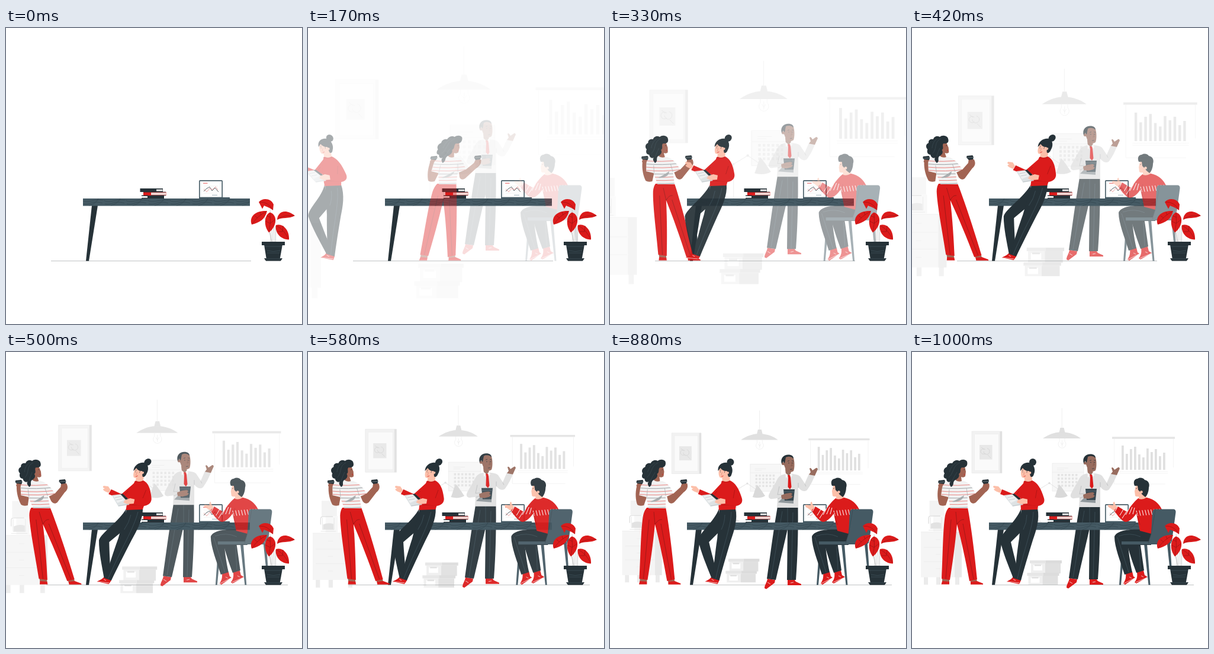
Animation of 500x500 px, one loop 1.04 s. Source, as an HTML page with a canvas:

```html
<!DOCTYPE html>
<html lang="en">
<head>
<meta charset="utf-8">
<title>Office team</title>
<style>
html, body { margin: 0; width: 100%; height: 100%; overflow: hidden; background: #fff; }
canvas { display: block; width: 500px; height: 500px; }
</style>
</head>
<body>
<canvas id="stage" width="500" height="500"></canvas>
<script>
const LOOP = 1040, STEP = 1000 / 24;
const RED = '#db1b1b', DEEP = '#a51212', INK = '#263238', SLATE = '#455a64';
const BROWN = '#a26453', TAN = '#986c5e', SKIN = '#fcbfa9', GREY = '#e0e0e0';

const stage = document.getElementById('stage').getContext('2d');
const sheet = document.createElement('canvas');
sheet.width = sheet.height = 500;
const layer = sheet.getContext('2d');
let g = stage;

const cache = {};
const path = d => cache[d] || (cache[d] = new Path2D(d));
function fill(color, d) { g.fillStyle = color; g.fill(path(d)); }
function line(color, width, d) {
  g.strokeStyle = color;
  g.lineWidth = width;
  g.stroke(path(d));
}
function box(color, x, y, w, h) { g.fillStyle = color; g.fillRect(x, y, w, h); }
function dot(color, x, y, r) {
  g.fillStyle = color;
  g.beginPath();
  g.arc(x, y, r, 0, 7);
  g.fill();
}

// cubic-bezier(.36, -.01, .5, 1.38)
function ease(x) {
  if (x <= 0) return 0;
  if (x >= 1) return 1;
  const curve = (s, a, b) => 3 * (1 - s) * (1 - s) * s * a + 3 * (1 - s) * s * s * b + s * s * s;
  let lo = 0, hi = 1;
  for (let i = 0; i < 24; i++) {
    const mid = (lo + hi) / 2;
    if (curve(mid, .36, .5) < x) lo = mid; else hi = mid;
  }
  return curve(lo, -.01, 1.38);
}

function group(draw, alpha, matrix) {
  layer.setTransform(1, 0, 0, 1, 0, 0);
  layer.clearRect(0, 0, 500, 500);
  layer.setTransform(...matrix);
  g = layer;
  draw();
  g = stage;
  g.globalAlpha = Math.max(0, Math.min(1, alpha));
  g.drawImage(sheet, 0, 0);
  g.globalAlpha = 1;
}

// Rush in from one side, lean over, settle
function rush(draw, p, dir) {
  let shift = 0, lean = 0, alpha = 1;
  if (p < .6) {
    const e = ease(p / .6);
    shift = -255 * (1 - e);
    lean = 20 - 30 * e;
    alpha = e;
  } else if (p < .8) lean = -10 + 12 * ease((p - .6) / .2);
  else lean = 2 - 2 * ease((p - .8) / .2);
  const k = Math.tan(lean * Math.PI / 180) * dir;
  group(draw, alpha, [1, 0, k, 1, shift * dir - k * 286, 0]);
}

function backdrop() {
  // picture
  box('#f2f2f2', 101, 134, 51, 70.5);
  box(GREY, 148.5, 134, 3.5, 70.5);
  line('#e6e6e6', .6, 'M101 134H152V204.5H101ZM106 139H146V200H106Z');
  box('#fafafa', 106, 139, 40, 61);
  box('#e8e8e8', 114, 157, 21.5, 24.5);
  line('#d4d4d4', .8, 'M124 165A4.5 4.5 0 1 0 124 171M121 168A5 5 0 1 0 127 163M117 161L122 165M128 174L133 179');

  // ceiling lamp
  line('#e8e8e8', .7, 'M253.2 95V128');
  fill(GREY, 'M250.5 128H256.5L258.5 136H248.5Z');
  fill(GREY, 'M221 146C231 139 241 136 249 135.5H258C270 137 279 141 285 146Z');
  line('#ebebeb', .7, 'M249 146V151A6.5 6.5 0 1 0 258 151V146M251 153L253.5 157L256 153M253.5 149V160');

  // calendar
  box('#f7f7f7', 237, 188, 53, 47);
  line('#e8e8e8', .7, 'M237 188H290V235H237ZM245 196H264M245 199H257M237 203H290');
  for (let r = 0; r < 4; r++)
    for (let c = 0; c < 6; c++) box('#e4e4e4', 246 + c * 6, 206 + r * 6, 3.4, 3.6);

  // desk lamp
  line('#e4e4e4', 1, 'M213 287V233L232 221.5L249 233');
  dot(GREY, 232, 221.5, 1.7);
  dot(GREY, 213, 233, 1.5);
  fill('#d9d9d9', 'M249 224C253 228 258 236 263 243C257 247 248 247 241 245C244 239 245 231 249 224Z');
  fill('#e8e8e8', 'M206 288Q213 280 220 288Z');

  // bar chart
  box('#e4e4e4', 338, 143.3, 106, 3.4);
  line('#efefef', .7, 'M341.5 147V223H428M441.5 147V195M351 202H432M351 205H432');
  [158, 172, 164, 160, 173, 178, 163, 169, 164, 176, 170].forEach((y, i) => box(GREY, 354 + i * 7, y, 3.8, 199 - y));

  // cabinet and coffee maker
  box('#f3f3f3', 29.5, 251, 25, 25);
  box('#f7f7f7', 36, 276, 20, 27);
  fill('#e2e2e2', 'M32 290Q40 286 49 289V298H32Z');
  line(GREY, 1.4, 'M28 290V281Q28 277 32 277H48');
  line(GREY, .8, 'M31 279V298H50V279M28 301H53');
  for (const x of [20, 41, 73]) box('#ebebeb', x, 380, 7, 13);
  box('#f5f5f5', 15, 304, 57, 76.5);
  box('#e8e8e8', 72, 304, 12, 76.5);
  line('#e9e9e9', .7, 'M15 304H84M20 330H71M20 354H71M40 317H48M40 342H48M40 366H48');

  // cartons
  for (const [x, y, h] of [[199, 352, 17], [194.5, 373, 15]]) {
    box('#efefef', x + 2, y + 5, 24, h);
    box(GREY, x + 26, y + 5, 26, h);
    box('#e6e6e6', x, y, 27, 5);
    box('#dcdcdc', x + 27, y, 27, 5);
    box('#fff', x + 6, y + 8, 15, 9);
    box(GREY, x + 8, y + 7, 11, 2.5);
  }
}

function desk() {
  fill(INK, 'M145 300H155L140 393.5H135Z');
  box(SLATE, 130, 288, 282, 12.5);
  g.save();
  g.beginPath();
  g.rect(130, 288, 282, 12.5);
  g.clip();
  for (let i = 0; i < 8; i++) {
    const x = 128 + i * 37;
    line('#2f424b', .6, `M${x} 291C${x + 10} 297 ${x + 20} 288 ${x + 36} 291M${x + 2} 297C${x + 16} 300 ${x + 16} 290 ${x + 35} 296M${x + 12} 300Q${x + 24} 297 ${x + 28} 288`);
  }
  g.restore();

  // books
  box(INK, 226.5, 271, 38.5, 6);
  box('#e8e8e8', 254, 272.6, 10.5, 3);
  box(RED, 232, 277, 38.5, 6);
  box('#f6d9d6', 245, 278, 25.5, 4.2);
  line('#c9a5a3', .4, 'M245 280H270');
  box(INK, 229, 283, 38, 5);
  box('#fff', 229, 284, 10, 2.8);
  line(INK, .8, 'M229 283H240M229 287.5H240M232 277.2H270M245 282.8H270');

  // laptop
  fill(SLATE, 'M328 257H364Q366 257 366 259V287H326V259Q326 257 328 257Z');
  box('#f7f9fa', 327.6, 258.7, 36.8, 27);
  box('#fff', 331, 260.5, 30, 24);
  box(SLATE, 326, 286, 52, 2.2);
  box('#ef8d8d', 333, 261.6, 7.5, 1.5);
  line('#dde1e3', .5, 'M334 267H358M334 271H358M334 275H358M334 279H358');
  line(INK, .7, 'M334 276L339 271L344 268.5L348 275L353 270L359 277');
  line('#ef8d8d', .7, 'M334 272L339 277L344 271L349 273L354 268L358 274');
  line('#78909c', .7, 'M348 282.3H357');
}

function standing() {
  // legs and shoes
  fill(RED, 'M266 382L279 384L278 389L264 399.5L261 398C261 392 265 389 266 382Z');
  fill(RED, 'M300 383H311L314 387L323 391V393H300Z');
  line('#fff', .7, 'M266 388L271 391M305 389L310 388');
  fill(INK, 'M283 260H317.5C318 300 317 345 314 384H299L300 298L280 384L265 382C271 340 276 300 283 260Z');
  line(SLATE, .6, 'M300 262V298M291 268L272 381M309 270L306 383');
  // shirt
  fill(GREY, 'M297 205C289 206 285 209 282 215C277 225 271 233 268 241C267 246 271 248 275 247L283 246L282 262H318V228C323 234 329 236 333 232C339 224 343 215 346 208L336 205L329 221L321 209C317 206 312 205 306 205Z');
  line('#a9adaf', .6, 'M286 226L283 240L291 239M318 228V220M283 247L291 244M329 222L331 226');
  // raised hand
  fill(TAN, 'M336 206L339 202L337 196C338 194 340 195 342 199L348 195C350 194 352 197 350 199L346 208Z');
  // head
  fill(TAN, 'M296 196L297 206L301 210L306 205L305 200Z');
  fill(TAN, 'M294 179C298 174 307 174 310 178C312 184 312 195 310 200C306 203 300 202 297 198L294 190Z');
  dot(TAN, 292.5, 187.5, 2.6);
  fill(INK, 'M290 188C287 178 294 172.5 301 172.5C307 172.5 310 175 310 179C306 175 301 175 297 177L295 187L292.5 184Z');
  line(INK, .7, 'M300 183.5L303 182.5M307 182.5L310 183.5M304 197Q306 198 308 196.5');
  line('#70483b', .6, 'M306 185L308 191H305');
  dot(INK, 302, 186.5, .7);
  dot(INK, 308.5, 186.5, .7);
  // collar and tie
  fill('#f7f7f7', 'M296 203L302 208L306 203L308 208L304 212L301 209L297 212Z');
  fill(RED, 'M300 207H304L305 211L306.5 227L304 231L300.5 227L301 211Z');
  // notebook and cup
  fill('#90989c', 'M284 253L290 247L310 248V255Z');
  fill('#37474f', 'M293 231H312L310 250H295Z');
  line('#60727b', .7, 'M293 235H312');
  fill(TAN, 'M289 241L297 238L304 237C308 237 309 239 306 241L309 243L306 246L298 248L290 247Z');
}

function seated() {
  // chair legs
  fill(SLATE, 'M355 324H359.5L353 393.5H350ZM392 324H397L402.5 393.5H399.5ZM431 324H436L438.5 362H435Z');
  // shoes
  fill(RED, 'M361 374L372 371L374 379L377 381L360 393L357 391C360 386 362 382 361 374Z');
  fill(RED, 'M380 372L391 369L393 377L398 380L379 391L376 389C380 384 381 379 380 372Z');
  line('#fff', .7, 'M358 391L376 382M378 389L397 381M367 380L371 382M387 378L391 380');
  // trousers
  fill(INK, 'M362 320H385L392 369L379 373C372 354 367 339 362 320Z');
  fill(INK, 'M386 300C366 299 345 302 342 312C342 330 352 353 359 376L372 372C368 354 366 338 365 326H404V300Z');
  line(SLATE, .6, 'M347 313L366 372M384 328L386 368M349 311Q368 304 386 312');
  // body
  fill(RED, 'M384 246C376 251 370 260 363 270L348 261L341 267C347 277 356 287 361 287C368 286 374 280 379 273L385 302L404 307L410 270L422 266C417 255 409 249 397 246Z');
  for (let i = 0; i < 9; i++) {
    const x = 379 + i * 4.9;
    line('#fff', 1, `M${x} ${268 - i * .4}L${x + 2.2} ${277 - i * .4}`);
  }
  line('#fff', 1, 'M357 266L351 276M362 270L355 281M367 264L361 275M372 262L367 274M376 263L373 274M347 262L343 269');
  line(DEEP, .6, 'M379 273L383 264M380 274L385 292');
  // hand
  fill(SKIN, 'M347 262L343 257L342 253C340 253 339 255 340 259L332 258C330 259 331 262 334 263L341 268Z');
  // head
  fill(SKIN, 'M379 222L376 235L377 243Q379 245 383 244V248Q390 250 396 246V228Z');
  fill(INK, 'M376 226C373 219 376 214 381 214C386 211 391 213 393 216C400 217 402 224 400 229C400 236 397 243 394 245L389 241L386 237L382 233L381 226Z');
  dot(SKIN, 387.5, 236.5, 2.3);
  line(INK, .7, 'M378 231L380 230');
  // chair seat and back
  box(SLATE, 354, 320, 50, 5.2);
  fill(SLATE, 'M410 265.5H442Q446 266 445.5 271L439 319Q438 325 432 325H398L404 307L406 270Q407 266 410 265.5Z');
  line('#37474f', .7, 'M411 267L404 307L399 323');
}

function cup(x, y) {
  fill(INK, `M${x} ${y + 1}L${x + 10} ${y}L${x + 11} ${y + 3}L${x + 9} ${y + 8}L${x + 2} ${y + 8}L${x - 1} ${y + 4}Z`);
  line('#718087', .8, `M${x} ${y + 4}L${x + 11} ${y + 3.5}`);
}

function curly() {
  // feet
  box(BROWN, 51, 382, 12, 6);
  fill(BROWN, 'M98 383L109 382L110 389H99Z');
  fill(RED, 'M51 387L63 388V392.5H49.5ZM99 388L110 387L120 391V392.7H99Z');
  // trousers
  fill(RED, 'M62 263H94C99 287 106 342 110 384L97 387C91 354 84 321 76 291C73 325 68 360 64 385L50 383C52 345 52 300 56 276Q58 267 62 263Z');
  line('#7e1716', .6, 'M76 291Q82 282 88 283M76 291L74 270M86 290L104 384M66 283L57 383');
  // far arm
  fill(BROWN, 'M45 226C42 238 43 250 46 258Q50 261 57 259L63 242L53 239L54 226L50 222Z');
  cup(45, 216);
  fill(BROWN, 'M44 226L46 222L54 223L54 228L48 230Z');
  // shirt
  const shirt = 'M64 218C57 219 53 222 51 229L49 242L61 245L65 264H94V243L97 245L107 240C103 229 97 221 88 218Z';
  fill('#f2f2f2', shirt);
  g.save();
  g.clip(path(shirt));
  for (let i = 0; i < 8; i++) line(i % 3 == 1 ? '#8b9296' : '#e66a66', .8, `M46 ${224 + i * 5.4}Q78 ${227 + i * 5.4} 109 ${223 + i * 5.4}`);
  g.restore();
  fill('#a8adaf', 'M67 253C77 254 87 250 88 242C83 245 75 250 67 253Z');
  line('#9aa0a3', .6, 'M62 245L63 232M94 243L92 230');
  // near arm
  fill(BROWN, 'M96 244L107 239L119 228L121 222L130 222C132 228 130 233 124 237L108 254C104 257 100 256 98 252Z');
  cup(119, 215);
  line(BROWN, 2, 'M121 224L129 223');
  // head
  fill(BROWN, 'M78 195L89 193L91 202L90 210Q87 213 83 211L84 218Q79 220 74 217L74 204Z');
  fill(INK, 'M93 185C90 181 84 181 80 184C75 181 70 184 68 188C63 187 59 190 59 194C54 196 52 201 55 205C52 210 54 214 58 214C58 218 61 221 65 219C62 222 64 225 66 228C72 225 68 221 72 217C78 214 81 210 79 206C84 203 80 198 84 195C90 196 95 193 93 185Z');
  line('#3d4d55', .6, 'M81 187Q73 190 70 199T62 212M75 187Q66 192 63 203M76 203Q72 209 68 217');
  line(INK, .7, 'M87 199L89 198.5');
  line(RED, .8, 'M87.5 207L89.5 206.5');
}

function bun() {
  // shoes
  fill(RED, 'M171 379L183 382L184 386L181 392L160 388C164 385 169 384 171 379Z');
  line('#fff', .7, 'M161 388L181 390M171 384L175 386');
  // trousers
  fill(INK, 'M184 265C176 287 151 304 149 318C153 338 163 361 171 382L181 378C176 357 171 339 167 321L188 300Z');
  fill(INK, 'M185 265L212 264C216 282 210 301 204 318C196 344 190 364 184 386L172 382C176 357 177 340 181 315Z');
  line(SLATE, .6, 'M205 270C204 298 189 333 178 383M188 300Q194 288 194 275');
  // front arm
  fill(SKIN, 'M151 233L146 227L138 226C136 228 138 230 141 230L138 232C140 235 144 236 149 238Z');
  fill(RED, 'M152 232L171 240L188 222L194 238L178 251L149 240Z');
  // sweater
  fill(RED, 'M189 218Q196 215 203 217C212 221 218 230 223 247C225 254 221 259 213 260L212 266L184 267L183 250L186 230Z');
  line(DEEP, .7, 'M211 233L208 249M190 219L203 219M188 258L211 259M177 240L181 235');
  // notebook
  fill('#dde2e4', 'M155 242L171 240L188 258L170 261Z');
  fill('#eef0f1', 'M158 243L170 242L178 250L167 255Z');
  fill(INK, 'M169 240L173 239.5L185 249L182 251Z');
  line('#aeb6ba', .6, 'M161 246L171 244M164 250L174 248M170 260L187 257');
  fill(SKIN, 'M196 249L187 247L179 250L177 254L184 257L196 256Z');
  fill(RED, 'M195 247L212 247L217 255L213 260L195 258Z');
  // head
  fill(SKIN, 'M185 196L197 193L202 203L203 217Q196 221 190 217V213L186 212C183 207 184 202 185 196Z');
  dot(INK, 204, 186, 6);
  fill(INK, 'M183 201C182 191 190 186 198 187C207 189 209 200 206 206C205 211 202 212 200 210L198 201C193 201 189 199 187 196Z');
  dot(SKIN, 199.5, 204, 1.9);
  line(INK, .7, 'M186 200L188 199.5M193 201L195 201.5');
  dot(INK, 187, 202.5, .6);
  dot(INK, 194, 203.5, .6);
  line('#d98170', .6, 'M190 203L188.5 207H190');
  line(RED, .8, 'M188.5 210Q190.5 210.5 192 209');
}

function plant() {
  line('#b5b5b5', .7, 'M447 361Q448 350 445 340M450 361Q449 330 446 308M453 361L452 320M455.5 361V334M449 361Q443 335 436 318');
  fill(RED, 'M427 294C434 286 448 288 452 298L451 308C445 303 440 302 436 300L433 305.5Z');
  fill(RED, 'M415 332C410 319 421 308 441 309C438 323 428 329 415 332Z');
  fill(RED, 'M458 324C459 309 473 305 488 317C478 323 465 319 458 324Z');
  fill(RED, 'M444 345.5C434 333 437 315 446 311.5C460 316 457 336 444 345.5Z');
  fill(RED, 'M478 357.5C461 357 454 343 456 333C468 329 479 342 478 357.5Z');
  line('#8c1214', .6, 'M428 294Q442 293 451 307M416 331Q425 317 440 310M420 317L425 321M429 311L431 316M459 323Q470 315 487 317M444 344Q448 329 446 313M438 326L446 330L454 324M440 317L447 320M477 356Q470 341 457 334M459 344L467 344L468 334');
  fill(INK, 'M436 366H467L462.5 391H440Z');
  box(INK, 432, 361, 39, 6);
  fill(INK, 'M436 389H467L464 393.5H439Z');
  line(SLATE, .6, 'M437 369H466M441 376Q451 379 463 376M441 380H462M439 390H464');
}

function floor(k) {
  const left = k < 12 ? 76 : k < 16 ? 68 : k < 20 ? 17 : 140;
  line('#a5a9ab', .7, `M${left} 393.5H${k < 12 ? 414 : 476}`);
}

function render(k) {
  g = stage;
  g.fillStyle = '#fff';
  g.fillRect(0, 0, 500, 500);
  const p = Math.min(1, (k + .85) / 24), e = ease(p), on = k > 1;
  if (on) {
    const s = 1.5 - .5 * e;
    group(backdrop, e, [s, 0, 0, s, 229.5 * (1 - s), 244 * (1 - s)]);
  }
  floor(k);
  if (on) group(standing, e, [1, 0, 0, 1, 0, -20 * (1 - e)]);
  desk();
  if (on) {
    group(seated, e, [1, 0, 0, 1, 20 * (1 - e), 0]);
    rush(curly, p, -1);
    rush(bun, p, 1);
  }
  plant();
}

const start = performance.now();
let shown = -1;
function tick() {
  const t = (performance.now() - start) % LOOP;
  const k = Math.min(24, Math.floor((t + 5) / STEP));
  if (k !== shown) render(shown = k);
  requestAnimationFrame(tick);
}
tick();
</script>
</body>
</html>
```
